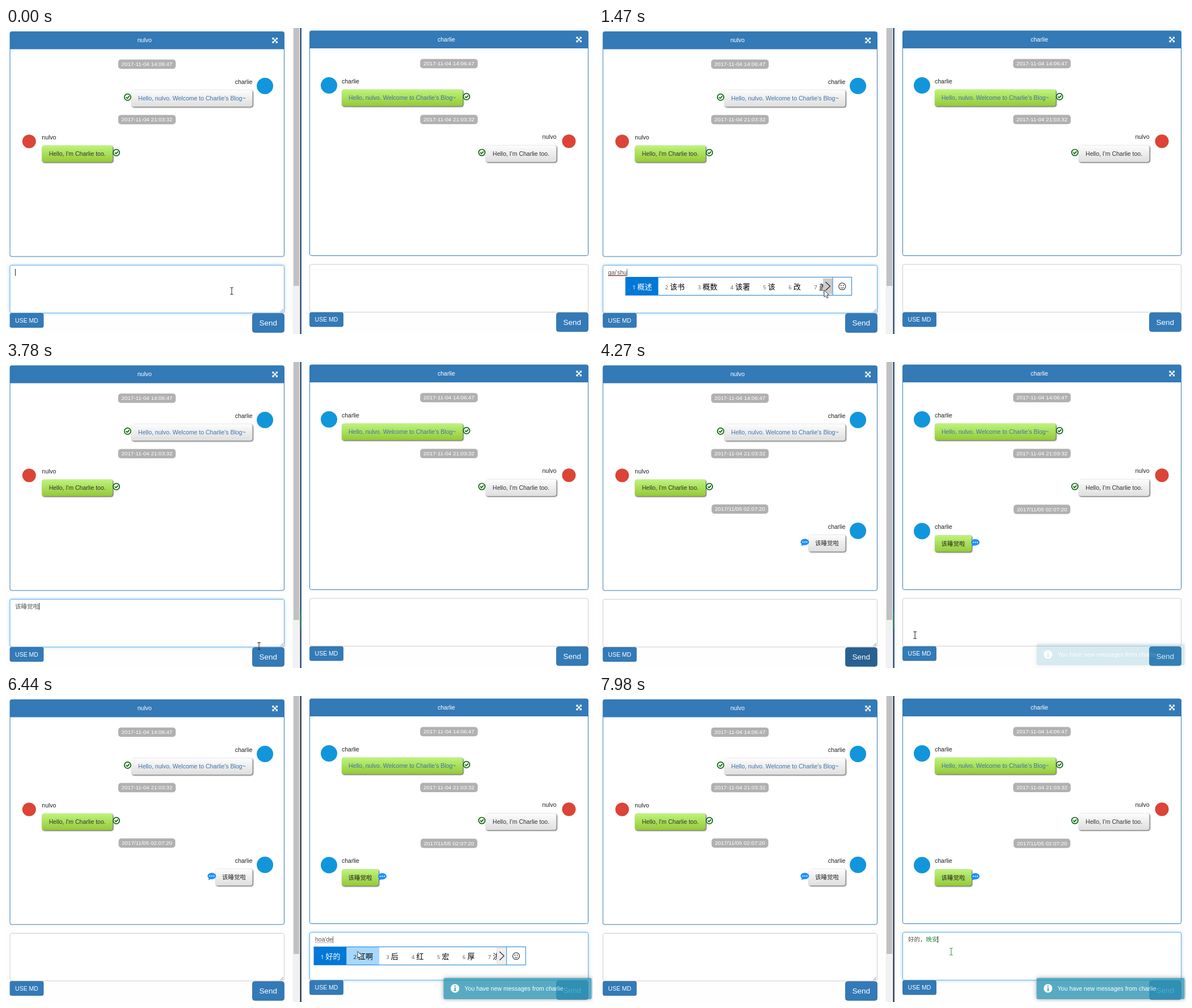
These frames come from a looping animation (1035x541 px, 8 s). An HTML page:

```html
<!DOCTYPE html>
<html lang="zh-CN">
<head>
<meta charset="utf-8">
<title>Chat</title>
<style>
html, body { margin: 0; width: 100%; height: 100%; overflow: hidden; background: #fefefe; }
svg { display: block; }
text { font: 10.5px "Liberation Sans", Arial, "Noto Sans CJK SC", sans-serif; white-space: pre; }
.ime text { font: 13px "Noto Sans CJK SC", "Noto Sans CJK", sans-serif; }
.ime .num { font: 9.5px "Noto Sans", sans-serif; }
.bubble { filter: drop-shadow(1.3px 1.3px 1px #444); }
.focus { filter: drop-shadow(0 0 2.5px rgba(102,175,233,.6)); }
.toast { filter: drop-shadow(0 0 4px #999); }
</style>
</head>
<body>
<svg width="1035" height="541" viewBox="0 0 1035 541">
  <defs>
    <linearGradient id="green" x2="0" y2="1"><stop stop-color="#bef47c"/><stop offset="1" stop-color="#95c938"/></linearGradient>
    <linearGradient id="white" x2="0" y2="1"><stop stop-color="#fdfdfd"/><stop offset="1" stop-color="#dedede"/></linearGradient>
  </defs>
  <g id="scene"></g>
</svg>
<script>
const LOOP = 8000, SENT = 4060, SWITCH = 4620, TOAST = 4200;
const BLUE = '#337ab7', ME = 'charlie', PEER = 'nulvo';
const scene = document.getElementById('scene');
const pen = document.createElement('canvas').getContext('2d');
pen.font = '10.5px "Liberation Sans", Arial, "Noto Sans CJK SC", sans-serif';
const widthOf = s => pen.measureText(s).width;

// time, pane, committed text, typed letters, candidates, popup x
const edits = [
  [0, 'L', ''],
  [700, 'L', '', 'g', '个 该 给 过 跟 高 更'],
  [840, 'L', '', 'ga', '噶 嘎 尬 尕 旮 伽 钆'],
  [980, 'L', '', 'gai', '该 改 盖 概 钙 丐 溉'],
  [1190, 'L', '', "gai's", '该死 改善 该是 概述 该说 改 盖'],
  [1330, 'L', '', "gai'sh", '改善 该是 概述 该说 盖上 该书 改水'],
  [1470, 'L', '', "gai'shu", '概述 该书 概数 该署 该 改 盖'],
  [1610, 'L', '', "gai'shui", '该睡 该谁 改水 该 改 盖 概'],
  [1890, 'L', '', "gai'shui'j", '该睡觉 该睡 该谁 改水 该 改 盖'],
  [1960, 'L', '', "gai'shui'ji", '该睡觉 该睡 该谁 改水 该 改 盖'],
  [2030, 'L', '', "gai'shui'jia", '该睡觉 该睡 该谁 改水 盖水 概水 该税'],
  [2100, 'L', '', "gai'shui'jiao", '该睡觉 该睡 该谁 改水 该 改 盖'],
  [2450, 'L', '', "gai'shui'jiao'l", '该睡觉了 该睡觉啦 该睡觉 该睡 该谁 改水 该'],
  [2590, 'L', '', "gai'shui'jiao'la", '该睡觉啦 该睡觉 该睡 该谁 改水 该 改'],
  [2730, 'L', '该睡觉啦'],
  [SENT, '', ''],
  [SWITCH, 'R', ''],
  [5460, 'R', '', 'h', '和 好 还 会 后 很 话'],
  [5530, 'R', '', 'ho', '后 红 侯 厚 候 吼 洪'],
  [5600, 'R', '', 'hoa', '红啊 后 红 宏 厚 洪 候'],
  [5880, 'R', '', "hoa'd", '好的 红啊 后 红 宏 厚 洪'],
  [6020, 'R', '', "hoa'de", '好的 红啊 后 红 宏 厚 洪'],
  [6510, 'R', '好的'],
  [6790, 'R', '好的，'],
  [7070, 'R', '好的，', 'w', '我 为 问 我们 玩 无 完'],
  [7140, 'R', '好的，', 'wa', '哇 挖 娃 瓦 娃娃 袜 蛙'],
  [7210, 'R', '好的，', 'wan', '完 晚上 玩 万 晚 碗 完了'],
  [7420, 'R', '好的，', "wan'a", '晚安啊 晚安哦 晚安 玩啊 晚安吧 万安 玩爱', 551],
  [7560, 'R', '好的，', "wan'an", '晚安 晚安啊 晚安哦 晚安吧 万安 玩 万一', 557],
  [7700, 'R', '好的，晚安'],
];
const blinks = [[140, 700], [3220, 3710], [4970, 5460], [7700, 7980]];
const path = [[0, 398, 465], [3500, 398, 465], [3780, 446, 502], [3920, 457, 517],
  [4060, 457, 517], [4270, 557, 483], [SWITCH, 621, 452], [LOOP, 621, 452]];

const rect = (x, y, w, h, fill, more = '') => `<rect x="${x}" y="${y}" width="${w}" height="${h}" fill="${fill}" ${more}/>`;
const text = (x, y, s, fill = '#333', more = '') => `<text x="${x}" y="${y}" fill="${fill}" ${more}>${s}</text>`;
const line = (d, color, w = 1, more = '') => `<path d="${d}" fill="none" stroke="${color}" stroke-width="${w}" ${more}/>`;
const dot = (x, y, r, fill, more = '') => `<circle cx="${x}" cy="${y}" r="${r}" fill="${fill}" ${more}/>`;
const at = (x, y, s) => `<g transform="translate(${x} ${y})">${s}</g>`;
const mid = 'text-anchor="middle"', end = 'text-anchor="end"';

const check = (x, y) => at(x, y, dot(0, 0, 5.6, '#fff', 'stroke="#0b650b" stroke-width="1.7"') +
  line('M-2.8 -.2L-.7 2L3 -1.8', '#0b650b', 1.8));
const dots = (x, y) => at(x, y, '<ellipse rx="7.5" ry="5.7" fill="#1e90ff"/><path d="M-5 2L-6 7L0 5Z" fill="#1e90ff"/>' +
  [-3.5, 0, 3.5].map(d => dot(d, 0, 1.1, '#fff')).join(''));
const expand = (x, y) => at(x, y, line('M-3 -3L3 3M-3 3L3 -3', '#fff', 1.7) +
  [0, 90, 180, 270].map(a => `<path d="M-4.8 -4.8h4l-4 4z" fill="#fff" transform="rotate(${a})"/>`).join(''));

const stamp = (x, y, s) => {
  const w = s.includes('/') ? 100 : 101.5;
  return rect(x - w / 2, y - 8.3, w, 16.6, '#b1b1b1', 'rx="5"') + text(x, y + 3.4, s, '#fff', mid + ' style="font-size:9.75px"');
};
const avatar = (x, y, name) => name == ME ? dot(x, y, 14.5, '#1296db') : dot(x, y, 12, '#db4437');

// One message: y is the centre of its time stamp; own messages sit on the right.
function message(pane, y, date, name, body, w, icon, own, color) {
  const x = own ? pane.right - w : pane.left, far = x + w;
  return stamp(pane.mid, y, date) +
    avatar(own ? pane.right + 22 : pane.left - 22.5, y + 38.5, name) +
    text(own ? far : x, y + 34.5, name, '#222', own ? end : '') +
    rect(x, y + 45.7, w, 29.5, `url(#${own ? 'white' : 'green'})`, 'rx="4" class="bubble"') +
    text(x + w / 2, y + 64, body, color, mid) +
    icon(own ? x - 6.7 : far + 6.5, y + 58.3);
}
function chat(pane, rows, meOwn, t) {
  const list = [
    ['2017-11-04 14:06:47', ME, `Hello, ${PEER}. Welcome to Charlie's Blog~`, 213.5, check, meOwn, '#3d74ad'],
    ['2017-11-04 21:03:32', PEER, "Hello, I'm Charlie too.", 124.8, check, !meOwn, '#333'],
    ['2017/11/05 02:07:20', ME, '该睡觉啦', 65, dots, meOwn, '#222'],
  ];
  return list.slice(0, t < SENT ? 2 : 3).map((m, i) => message(pane, rows[i], ...m)).join('');
}

function frame(x, y, w, title, titleX) {
  return rect(x, y, w, 397.5, '#fff', `rx="3" stroke="${BLUE}"`) +
    `<path d="M${x} ${y + 31}v-28q0 -3 3 -3h${w - 6}q3 0 3 3v28z" fill="${BLUE}"/>` +
    text(titleX, y + 18.7, title, '#fff', mid) + expand(x + w - 16.3, y + 15.4);
}
function form(x, y, w, focus, sendColor) {
  return rect(x, y, w, 84.3, '#fff', `rx="3" stroke="${focus ? '#66afe9' : '#ccc'}" ${focus ? 'class="focus"' : ''}`) +
    rect(x, y + 85, 59, 25, BLUE, 'rx="2.5" stroke="#2e6da4" stroke-width=".8"') + text(x + 29.5, y + 101.3, 'USE MD', '#fff', mid) +
    rect(x + w - 56, y + 85.3, 56, 33.5, sendColor, 'rx="4" stroke="#2e6da4" stroke-width=".8"') +
    text(x + w - 28.2, y + 106.8, 'Send', '#fff', mid + ' style="font-size:13.5px"');
}

function popup(x, y, words, mouse) {
  const items = words.split(' ').map(s => ({ s, w: 32.2 + 12.7 * s.length }));
  const sep = x + items.reduce((sum, i) => sum + i.w, 0);
  const onNext = mouse.x >= sep - 17 && mouse.x < sep;
  const over = mouse.x >= x && mouse.x < sep + 33.5;
  let left = x, out = rect(x, y, sep + 33.5 - x, 32, '#fff');
  items.forEach(({ s, w }, i) => {
    const hover = !onNext && mouse.x >= left && mouse.x < left + w;
    if (!i || hover) out += rect(left, y, w, 32, i ? '#a6d8ff' : '#0078d7');
    out += text(left + 12, y + 21, i + 1, i ? hover ? '#222' : '#666' : '#fff', 'class="num"') +
      text(left + 20.5, y + 21.3, s, i ? '#000' : '#fff');
    left += w;
  });
  out += rect(sep - 17, y + 2, 17, 28, onNext ? '#ccc' : '#f0f0f0', onNext ? '' : 'stroke="#d0d0d0" stroke-width=".7"') +
    line(`M${sep - 12.5} ${y + 8.5}l8 7.5l-8 7.5`, '#222', 1.1) +
    rect(sep, y, 33.5, 32, '#fff') +
    line(`M${sep} ${y}v32`, '#2b8ad6') +
    at(sep + 16.8, y + 16.3, dot(0, 0, 6, 'none', 'stroke="#222" stroke-width="1.1"') +
      dot(-2, -1.6, .9, '#222') + dot(2, -1.6, .9, '#222') + line('M-3 1.4Q0 5 3 1.4', '#222')) +
    rect(x, y, sep + 33.5 - x, 32, 'none', 'stroke="#1a80d2"');
  return { out: `<g class="ime">${out}</g>`, over };
}

function cursor({ x, y }, kind, color) {
  const shapes = {
    beam: line('M-2.8 -6h2l.8 .8l.8 -.8h2M0 -5.2V5.2M-2.8 6h2l.8 -.8l.8 .8h2', color, 1.1),
    arrow: '<path d="M-1 -1V11L1.8 8.5L3.8 13L6 12L4 7.7H7.5Z" fill="#fff" stroke="#222" stroke-width=".9"/>',
    hand: '<path d="M-1 0q1 -2 2 0v5l6 1.3q1 .4 .8 2l-1 5.2h-6L-4 8q0 -2 3 0z" fill="#fff" stroke="#222" stroke-width=".9"/>',
  };
  return at(x.toFixed(1), y.toFixed(1), shapes[kind]);
}
function mouseAt(t) {
  const i = path.findIndex(p => p[0] > t), [t0, x0, y0] = path[i - 1], [t1, x1, y1] = path[i];
  const k = (t - t0) / (t1 - t0);
  return { x: x0 + (x1 - x0) * k, y: y0 + (y1 - y0) * k };
}

function typing(t, mouse) {
  const [, side, done, typed = '', words, fixedX] = edits.findLast(e => e[0] <= t);
  if (!side) return { out: '', over: false };
  const isLeft = side == 'L', x0 = isLeft ? 16 : 545, y = isLeft ? 432 : 430.5;
  const start = x0 + widthOf(done), caret = start + widthOf(typed);
  const body = done.replace('晚安', '<tspan fill="#2f8b4b">晚安</tspan>');
  let out = text(x0, y + 3.8, body + typed, '#555');
  if (typed) {
    out += line(`M${start} ${y + 5.5}H${caret}`, isLeft ? '#333' : '#666', 1, isLeft ? '' : 'stroke-dasharray="1.5 1"');
    if (isLeft) out += line(`M${start} ${y + 6}H${caret}`, '#e02020', 1.2, 'stroke-dasharray="2 1"');
  }
  if (!blinks.some(([a, b]) => t >= a && t < b))
    out += rect(Math.round(caret), y - 6, 1, 12, typed ? '#666' : '#222');
  if (!words) return { out, over: false };
  const box = popup(fixedX || (isLeft ? caret : start) - 2, isLeft ? 440.5 : 443.5, words, mouse);
  return { out: out + box.out, over: box.over };
}

function toast(t) {
  const k = Math.min(1, (t - TOAST) / 300);
  if (k <= 0) return '';
  return `<g opacity="${(.8 * k).toFixed(3)}"><g class="toast">${rect(771.5, 498.5, 261, 37.5, '#2f96b4', 'rx="2.5"')}</g>` +
    dot(791.7, 516.8, 7.6, '#fff') + rect(790.6, 515.3, 2.4, 6, '#2f96b4') + rect(789.7, 520.3, 4.2, 1.2, '#2f96b4') +
    dot(791.7, 512.7, 1.3, '#2f96b4') + text(808.5, 520.6, `You have new messages from ${ME}`, '#fff') + '</g>';
}

function draw(t) {
  const mouse = mouseAt(t), input = typing(t, mouse);
  const onSend = mouse.x > 434 && mouse.x < 490.5 && mouse.y > 504;
  const active = t >= SWITCH;
  const darkSend = onSend || (t >= SENT && !active);
  const kind = input.over ? 'arrow' : onSend ? 'hand' : mouse.x > 490.5 && mouse.x < 535.5 ? 'arrow' : 'beam';
  const tip = kind == 'arrow' && active ? { x: 621, y: 452.5 } : mouse;
  return rect(505.5, 0, 12.5, 541, '#f1f1f1') + rect(507, 0, 10, 456, '#c1c1c1') +
    rect(518.5, 0, 2.3, 541, active ? '#1e2c40' : '#17406f') +
    (t >= 2730 && t < 4340 ? rect(518.5, 440, 1.2, 33, '#2e9a4a') : '') +
    frame(7, 6.5, 483.5, PEER, 244.3) +
    chat({ left: 63.3, right: 434.6, mid: 248.5 }, [64, 162, 260], true, t) +
    form(7, 419.5, 483.5, t < SENT, darkSend ? '#286090' : BLUE) +
    line('M483.5 502.5l5.5 -5.5M486.5 502.5l2.5 -2.5', '#777', .9) +
    frame(535.5, 5, 491, ME, 776.5) +
    chat({ left: 592, right: 970.5, mid: 781 }, [63, 161.8, 260.5], false, t) +
    form(535.5, 418, 491, active, BLUE) +
    input.out + toast(t) +
    cursor(kind == 'arrow' && !active ? { x: mouse.x, y: mouse.y - .5 } : tip, kind, t >= 7700 ? '#3a9a50' : '#333');
}

let last = '';
function tick() {
  const next = draw(performance.now() % LOOP);
  if (next != last) scene.innerHTML = last = next;
  requestAnimationFrame(tick);
}
tick();
</script>
</body>
</html>
```
